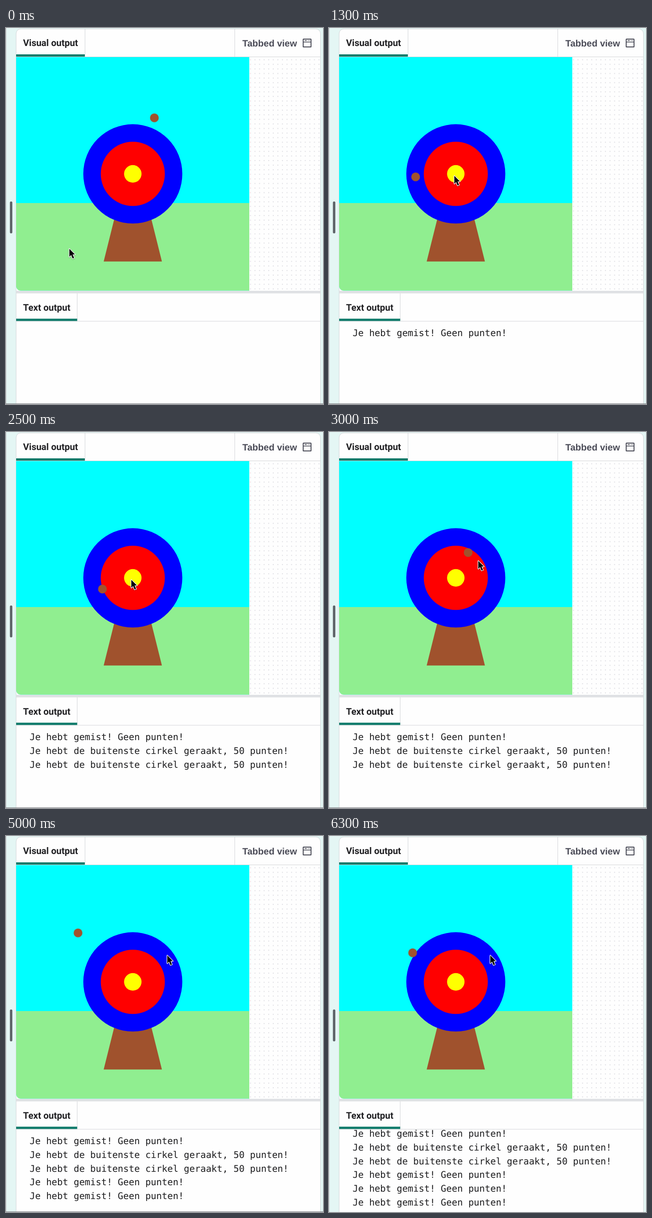
These frames come from a looping animation (688 by 814 pixels, 6400 ms). An HTML page:

```html
<!DOCTYPE html>
<html lang="nl">
<head>
<meta charset="utf-8">
<title>Visual output</title>
<style>
  html, body { margin: 0; width: 100%; height: 100%; overflow: hidden; background: #e4f6f4; }
  svg { display: block; width: 688px; height: 814px; text-rendering: geometricPrecision; }
  .tab { font: 700 20px Roboto, sans-serif; fill: #212124; }
  .view { font: 700 20px "Liberation Sans", Arial, sans-serif; fill: #4a4b57; }
  .log text { font: 19.87px "DejaVu Sans Mono", monospace; fill: #1c1c1e; }
  .rule { stroke: #d3d5d8; fill: none; }

  /* One loop is 6400 ms, so 100 ms is 1.5625% */
  .ball, .cursor, .scroll, .cover, .edge { animation: 6400ms step-end infinite; }
  .ball { animation-name: ball; }
  .cursor { animation-name: cursor; }
  .scroll { animation-name: scroll; }
  .cover { animation-name: cover; }
  .edge { animation-name: edge; }

  @keyframes ball {
    0% { transform: translate(322px, 194.5px); }
    7.8125% { transform: translate(376.2px, 357.5px); }
    15.625% { transform: translate(188px, 322.3px); }
    23.4375% { transform: translate(240px, 271px); }
    31.25% { transform: translate(259px, 414px); }
    39.0625% { transform: translate(209.3px, 340px); }
    46.875% { transform: translate(302px, 261px); }
    54.6875% { transform: translate(398px, 395.5px); }
    62.5% { transform: translate(354px, 288px); }
    70.3125% { transform: translate(403px, 368px); }
    78.125% { transform: translate(156.3px, 209.8px); }
    85.9375% { transform: translate(171.5px, 264px); }
    93.75%, 100% { transform: translate(181.5px, 252.8px); }
  }
  @keyframes cursor {
    0% { transform: translate(137.5px, 478px); animation-timing-function: steps(5); }
    7.8125% { transform: translate(231px, 272.5px); }
    10.9375% { transform: translate(229px, 288px); }
    12.5% { transform: translate(229px, 288px); animation-timing-function: steps(5); }
    20.3125% { transform: translate(272px, 320px); }
    40.625% { transform: translate(272px, 320px); animation-timing-function: steps(6); }
    50%, 100% { transform: translate(350px, 258.5px); }
  }
  @keyframes cover {
    0% { transform: translateY(0); }
    10.9375% { transform: translateY(29.7px); }
    21.875% { transform: translateY(59.4px); }
    32.8125% { transform: translateY(89.1px); }
    57.8125% { transform: translateY(118.8px); }
    75% { transform: translateY(148.5px); }
    85.9375%, 100% { transform: translateY(200px); }
  }
  @keyframes scroll {
    0% { transform: translateY(0); }
    85.9375%, 100% { transform: translateY(-16px); }
  }
  @keyframes edge {
    0% { opacity: 1; }
    98.4375%, 100% { opacity: 0; }
  }
</style>
</head>
<body>
<svg viewBox="0 0 688 814">
  <defs>
    <pattern id="dots" x="525.5" y="63.8" width="9.92" height="9.92" patternUnits="userSpaceOnUse">
      <circle cx="5" cy="5" r="1.2" fill="#dfdfe3"/>
    </pattern>
    <clipPath id="stage"><path d="M22 63H528V568.6H32A10 10 0 0 1 22 558.6Z"/></clipPath>
    <clipPath id="output"><rect x="23" y="635.5" width="659" height="179"/></clipPath>
    <filter id="shade" x="-50%" y="-50%" width="200%" height="200%">
      <feDropShadow dx="0" dy="1" stdDeviation="1" flood-opacity=".35"/>
    </filter>
  </defs>

  <rect width="688" height="814" fill="#e4f6f4"/>
  <path class="rule" d="M.5 0V814"/>
  <rect x="8.5" y="375.5" width="5.2" height="69" rx="2.6" fill="#5c6166"/>

  <!-- Panel -->
  <path d="M22 820V12A10 10 0 0 1 32 2H672.5A10 10 0 0 1 682.5 12V820Z" fill="#fefefe" stroke="#d3d5d8"/>
  <rect x="528" y="63" width="154" height="506" fill="url(#dots)"/>
  <path class="rule" d="M22 62.5H682M171.5 2V62M496.5 2V62"/>
  <rect x="22" y="57" width="149" height="5" fill="#107b6b"/>
  <text class="tab" x="37" y="39.2">Visual output</text>
  <text class="view" x="513" y="40">Tabbed view</text>
  <g fill="none" stroke="#4a4b57" stroke-width="2">
    <rect x="645" y="24" width="17" height="17" rx=".6"/>
    <path d="M645 30.5H662M648 27.3H653M655 27.3H656.5M658 27.3H659.5" stroke-width="1.6"/>
  </g>

  <!-- Scene -->
  <g clip-path="url(#stage)">
    <g transform="translate(22.4 63) scale(1.264)">
      <rect x="-1" y="-1" width="402" height="402" fill="#0ff"/>
      <rect x="-1" y="250" width="402" height="151" fill="#90ee90"/>
      <path d="M150 350L200 150L250 350Z" fill="#a0522d"/>
      <circle cx="200" cy="200" r="85" fill="#00f"/>
      <circle cx="200" cy="200" r="55" fill="#f00"/>
      <circle cx="200" cy="200" r="15" fill="#ff0"/>
    </g>
    <circle class="ball" r="9.5" fill="#a0522d"/>
  </g>

  <!-- Text panel -->
  <rect x="22" y="569" width="660" height="5.5" fill="#dfe1e4"/>
  <path class="rule" d="M22 634.9H682M154.5 574.5V634"/>
  <rect x="22" y="629.3" width="132.5" height="5" fill="#107b6b"/>
  <text class="tab" x="37" y="611.5">Text output</text>
  <g clip-path="url(#output)">
    <g class="scroll log">
      <text x="51.3" y="667.3">Je hebt gemist! Geen punten!</text>
      <text x="51.3" y="697">Je hebt de buitenste cirkel geraakt, 50 punten!</text>
      <text x="51.3" y="726.7">Je hebt de buitenste cirkel geraakt, 50 punten!</text>
      <text x="51.3" y="756.4">Je hebt gemist! Geen punten!</text>
      <text x="51.3" y="786.1">Je hebt gemist! Geen punten!</text>
      <text x="51.3" y="815.8">Je hebt gemist! Geen punten!</text>
      <rect class="cover" x="40" y="647" width="620" height="200" fill="#fefefe"/>
    </g>
  </g>
  <rect class="edge" y="812.8" width="688" height="1.2" fill="#85888a"/>

  <g class="cursor">
    <path d="M0 0V17.2L3.9 13.5L7.1 21L10.3 19.7L7.1 12.3H12.2Z" stroke="#fff" stroke-width="2.4" paint-order="stroke" stroke-linejoin="round" filter="url(#shade)"/>
  </g>
</svg>
</body>
</html>
```
